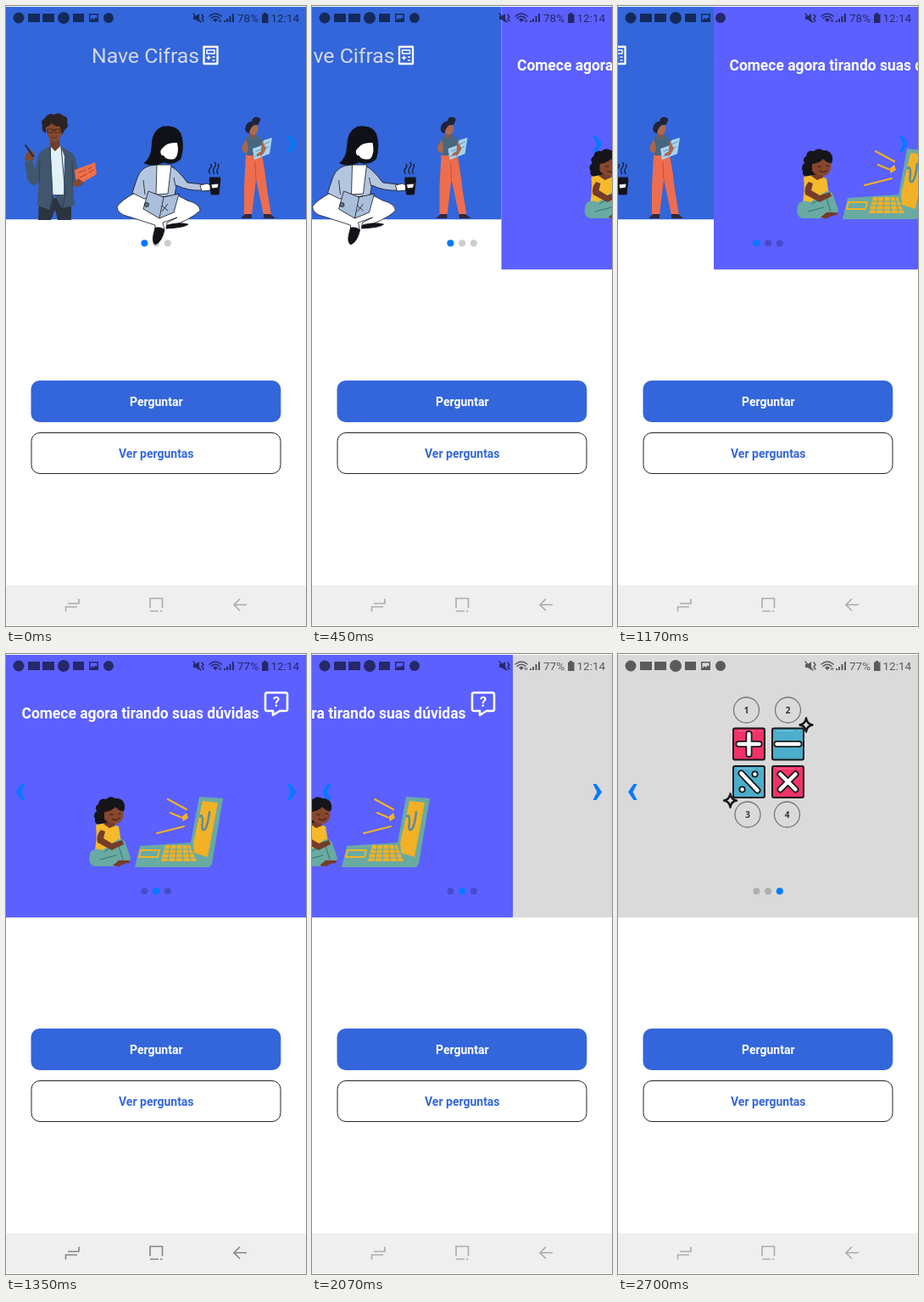
An HTML page that plays this animation: 354 px wide and 730 px high, repeating every 3.15 s.

```html
<!DOCTYPE html>
<html lang="pt">
<head>
<meta charset="utf-8">
<title>Carrossel</title>
<style>
  html, body { margin: 0; width: 100%; height: 100%; overflow: hidden; background: #fff; }
  svg { display: block; width: 354px; height: 730px; font-family: Roboto, sans-serif; }
  .line { fill: none; stroke-linecap: round; stroke-linejoin: round; }
  .b { font-weight: 700; }
  .mid { text-anchor: middle; }
</style>
</head>
<body>
<svg viewBox="0 0 354 730">
  <defs>
    <clipPath id="view"><rect y="1" width="354" height="310"/></clipPath>
    <path id="star" d="M0-8Q1-1 7.500 0Q1 1 0 8Q-1 1-7.500 0Q-1-1 0-8Z" fill="#dadada" stroke="#16161b" stroke-width="2.400" stroke-linejoin="round"/>
    <path id="chevron" d="M331.500 153h4l6.500 9.500-6.500 9.500h-4l5-9.500Z" fill="#007aff"/>
  </defs>

  <g clip-path="url(#view)">
    <g id="track">
      <g id="welcome">
        <path d="M0 1H354V251.200H0Z" fill="#3366da"/>
        <text x="101" y="67" font-size="24.800" fill="#d3d8e3">Nave Cifras</text>
        <g class="line" stroke="#fff" stroke-width="2.300">
          <path d="M233.500 48H249.500V68H233.500Z"/>
          <path d="M237 52H246V56H237ZM237 61H241M239 59V63M244 60H246M244 64H246" stroke-width="1.500"/>
        </g>

        <g id="man">
          <path d="M39 226H77L77 252H61L58 240 53 252H38Z" fill="#2b3440"/>
          <path d="M51 166L42 170Q37 175 34 193L31 181 22 184 25 203Q29 213 37 210L39 203 37 235 52 240 57 222 66 238 81 235 79 209Q87 215 92 209L87 202 82 180Q79 172 73 170L64 165Z" fill="#41566d"/>
          <path d="M53 164L57 170 64 164 69 177 68 222H55L53 180Z" fill="#e2f0f7"/>
          <path d="M52 167L55 222 52 239M65 166L70 220 67 237M40 182L39 208M78 183L79 211" class="line" stroke="#2c4056"/>
          <path d="M52 156H62L64 165 58 171 52 165Z" fill="#6d3f2c"/>
          <path d="M47 141Q56 134 66 142L65 153Q60 162 55 160 48 156 47 141Z" fill="#84492f"/>
          <path d="M47 150Q41 147 43 141Q40 135 46 132Q50 125 57 128Q63 124 67 129Q74 130 72 137Q75 143 69 146L66 152 64 142Q57 142 54 138Q50 142 47 143Z" fill="#2b2323"/>
          <path d="M49 145H55V149H49ZM58 145H64V149H58ZM55 146H58M53 155Q57 157 60 154" class="line" stroke="#432519" stroke-width=".8"/>
          <path d="M22 182L24 174 29 169 34 174 32 182Z" fill="#84492f"/>
          <path d="M23 164L32 177" class="line" stroke="#202936" stroke-width="2"/>
          <path d="M81 193L105 184 107 198 83 212Z" fill="#ee7049"/>
          <path d="M86 196L94 193M97 192L101 190M87 202L95 198M98 196L103 193" class="line" stroke="#9f4336"/>
          <path d="M78 209L85 203 91 207 84 214Z" fill="#84492f"/>
        </g>

        <g id="reader" stroke="#15161c" stroke-width=".8" stroke-linejoin="round">
          <path d="M152 220Q136 229 131 236Q131 245 145 248L176 258 176 265 187 264 185 255 202 249 190 255 189 261Q216 253 229 241Q229 233 214 229L197 220Z" fill="#fff"/>
          <path d="M176 261Q184 260 187 264Q184 278 176 281Q172 278 174 269Z" fill="#111319"/>
          <path d="M190 258Q204 254 215 257Q211 261 189 262Z" fill="#111319"/>
          <path d="M176 187Q160 188 155 202L149 220 163 227 199 223 201 211Q215 218 232 217V210L214 208Q203 193 195 189Z" fill="#b4c6df"/>
          <path d="M178 187L195 187 191 221 177 222Z" fill="#fff"/>
          <path d="M162 205L164 222M198 202L200 212" fill="none"/>
          <path d="M229 211L237 209 242 211 241 217 231 218Z" fill="#fff"/>
          <path d="M185 142Q201 140 206 150Q211 164 206 180Q198 188 186 184Q174 190 163 185Q171 179 172 166Q172 146 185 142Z" fill="#101116"/>
          <path d="M185 167Q190 160 202 161Q205 174 199 180Q189 182 186 176L184 176Q180 171 185 167Z" fill="#fff" stroke="none"/>
          <path d="M168 218L186 225 204 221 198 243 181 250 162 239Z" fill="#a9bedb"/>
          <path d="M186 225L181 250M184 235L191 241M191 233L184 242" fill="none"/>
          <circle cx="166" cy="234" r="2.500" fill="#65748c"/>
          <path d="M240 204H253L251 222H242Z" fill="#111319"/>
          <path d="M240 203H253" stroke-width="3"/>
          <path d="M242 210L251 209 250 214 243 215Z" fill="#fff"/>
          <path d="M241 198Q238 194 241 191T241 186M246 198Q243 194 246 190T246 184M250 198Q248 194 250 191T250 186" fill="none" stroke-width="1.200"/>
        </g>

        <g id="teacher">
          <path d="M283 175H302Q306 196 308 216L313 246H304L295 204 290 246H281L281 212Z" fill="#ee6d4e"/>
          <path d="M294 184L295 204" class="line" stroke="#c5513f"/>
          <path d="M277 250L282 245H290V250ZM304 245H312L318 250H304Z" fill="#30283b"/>
          <path d="M284 156L278 166 280 172 294 177 297 172 285 167 289 160Z" fill="#a9674c"/>
          <path d="M283 155L289 151 297 152 303 158 302 176H284L286 167Z" fill="#48677e"/>
          <path d="M288 147H294V153L291 156 288 153Z" fill="#94563f"/>
          <ellipse cx="292" cy="144" rx="5.500" ry="7.500" fill="#ad6a4d"/>
          <path d="M287 150Q280 148 283 141Q285 136 290 136Q291 130 297 131Q302 132 299 137Q298 141 293 140Q288 143 287 150Z" fill="#20243a"/>
          <path d="M291 168L302 164 304 158 314 155 311 174 293 181Z" fill="#a8d4ee"/>
          <path d="M294 177L302 173M295 171L301 169M304 163L311 160M304 168L310 166M303 164L301 177" class="line" stroke="#5685a9" stroke-width=".8"/>
          <path d="M302 158L307 168 303 175 296 177 296 174 301 171Z" fill="#a9674c"/>
        </g>
      </g>

      <g id="ask" transform="translate(354)">
        <path d="M0 1H354V310.200H0Z" fill="#5b60ff"/>
        <text class="b" x="18.500" y="75.800" font-size="17.450" fill="#fff">Comece agora tirando suas dúvidas</text>
        <path d="M308 45.500H330Q332 45.500 332 48V65Q332 67 330 67H323L315 72V67H308Q306 67 306 65V48Q306 45.500 308 45.500Z" class="line" stroke="#fff" stroke-width="2.600"/>
        <text class="b mid" x="319" y="62" font-size="17" fill="#fff">?</text>

        <g id="girl">
          <path d="M106 202Q112 196 121 199L133 203 136 222 124 234 104 235Q108 218 106 202Z" fill="#f5b92c"/>
          <path d="M100 233Q105 227 114 231L131 219Q138 216 141 223L147 240Q146 246 138 244L127 250H104Q95 246 100 233Z" fill="#69aaa2"/>
          <path d="M116 233L127 226M111 242L130 237M133 226L138 242" class="line" stroke="#33736e"/>
          <path d="M112 207Q106 213 108 222L125 231 139 224 137 219 125 223 115 217 117 209Z" fill="#753c28"/>
          <path d="M117 190H130L129 202 122 205 115 200Z" fill="#753c28"/>
          <path d="M112 200Q104 202 105 194Q102 189 107 185Q104 179 109 177Q110 169 118 171Q123 166 129 170Q138 169 140 178Q141 185 136 187L121 198Z" fill="#15151a"/>
          <path d="M116 186Q125 185 129 180Q134 185 138 185Q140 194 133 199Q122 202 116 194Z" fill="#87472d"/>
          <path d="M123 189H126M133 188H135M125 194Q130 198 134 193" class="line" stroke="#24130f"/>
          <path d="M126 249L133 243 145 243 146 246Q139 246 134 250Z" fill="#753c28"/>
        </g>

        <g id="laptop">
          <path d="M228 168L256 170 243 247 240 251H152L158 226 218 222Z" fill="#69aaa2"/>
          <path d="M232 173L250 175 238 239 222 234 221 222Z" fill="#f2b126"/>
          <path d="M229 191Q232 188 232 198Q230 208 234 207Q238 204 240 186" class="line" stroke="#5b8e98" stroke-width="2.500"/>
          <path d="M159 231H181L179 239H157Z" class="line" stroke="#f2b126" stroke-width="1.800"/>
          <path d="M188 225H217L225 244H183Z" fill="#f2b126"/>
          <path d="M187 230H219M186 235H221M184 240H223M194 225L191 244M201 225L200 244M208 225L209 244M214 225L218 244" class="line" stroke="#69aaa2" stroke-width="1.200"/>
          <path d="M191 171L213 183M194 187L206 192M178 211L210 203" class="line" stroke="#f2b126" stroke-width="2.200"/>
          <path d="M207 192L213 187 215 193 209 197Z" fill="#f2b126"/>
        </g>
      </g>

      <g id="maths" transform="translate(708)">
        <path d="M0 1H354V310.200H0Z" fill="#dadada"/>
        <g id="tiles"></g>
        <use href="#star" x="222" y="83.500"/>
        <use href="#star" x="132.500" y="172.500"/>
      </g>
    </g>
  </g>

  <g id="dots"></g>
  <use id="next" href="#chevron"/>
  <use id="prev" href="#chevron" transform="matrix(-1 0 0 1 354 0)"/>

  <g id="status" opacity=".58">
    <circle cx="15" cy="14" r="6.500"/>
    <path d="M26 9H40V19H26ZM43 9H57V19H43ZM79 9H92V19H79Z"/>
    <circle cx="68" cy="14" r="7"/>
    <path d="M98 9H109V19H98ZM99.500 10.500V17L102 14 104 16 106 13 107.500 15V10.500Z" fill-rule="evenodd"/>
    <circle cx="121" cy="14" r="6"/>
    <path d="M221 12H224L228 9V19L224 16H221Z"/>
    <path d="M221 9L230 19M231 10L233 13 231 15 233 18M240 12Q247 6 254 12M242 14.500Q247 10 252 14.500" class="line" stroke="#000" stroke-width="1.500"/>
    <path d="M244 16Q247 13 250 16L247 19ZM251 16H252V19H251ZM253 16H254V19H253ZM257 17H259V19H257ZM260 15H262V19H260ZM263.500 12H265.500V19H263.500ZM267 9H269V19H267Z"/>
    <path d="M302 9.500H304V8H307V9.500H309.500V20H302Z"/>
    <g font-size="13.500">
      <text id="charge" x="273" y="18.700"></text>
      <text x="312.500" y="18.700">12:14</text>
    </g>
  </g>

  <rect x="29.500" y="441" width="294.800" height="49" rx="10" fill="#3366da"/>
  <rect x="30" y="502.500" width="294" height="48" rx="10" fill="#fff" stroke="#25222c"/>
  <g class="b mid" font-size="14">
    <text x="177.300" y="471" fill="#fff">Perguntar</text>
    <text x="177.300" y="532" fill="#3366da">Ver perguntas</text>
  </g>

  <path d="M0 682H354V729H0Z" fill="#efefef"/>
  <path id="nav" d="M86 698V703.500H73M70.500 713V707.500H84M170 709V697.500H184.500V709M170 712.500H180M184.500 712.500H182M284 705H269M276 698L269 705 276 712" fill="none" stroke-width="1.600"/>
</svg>

<script>
const $ = id => document.getElementById(id);

function tile(x, y, color, sign) {
  const mark = (stroke, w) => `<path class="line" d="${sign}" stroke="${stroke}" stroke-width="${w}"/>`;
  return `<g transform="translate(${x} ${y})">
    <rect x="-18.500" y="-18.500" width="37" height="37" rx="2" fill="${color}" stroke="#17171c" stroke-width="2"/>
    <path class="line" d="M-13-15.500H7M12-15.500H14" stroke="#fff" opacity=".3"/>
    ${mark('#17171c', 8)}${mark('#fff', 4.5)}</g>`;
}

function badge(x, y, n) {
  return `<circle cx="${x}" cy="${y}" r="15" fill="none" stroke="#777" stroke-width="1.300"/>
    <text class="b mid" x="${x}" y="${y + 3.6}" font-size="10" font-family="Open Sans, sans-serif" fill="#333">${n}</text>`;
}

const pink = '#f23268', teal = '#4baeca';
$('tiles').innerHTML =
  badge(151.5, 66, 1) + badge(200.5, 66, 2) + badge(153, 189, 3) + badge(199.5, 189, 4) +
  tile(154.5, 106, pink, 'M-12 0H12M0-12V12') +
  tile(200.5, 106, teal, 'M-13 0H13') +
  tile(154.5, 150.5, teal, 'M-9-10L10 10M7-9h.1M-8 9h.1') +
  tile(200.5, 150.5, pink, 'M-9-9L9 9M9-9L-9 9');

const dots = [0, 1, 2].map(i => {
  const dot = document.createElementNS('http://www.w3.org/2000/svg', 'circle');
  dot.setAttribute('cx', 163.4 + i * 13.7);
  dot.setAttribute('cy', 279.2);
  dot.setAttribute('r', 4);
  return $('dots').appendChild(dot);
});

const STEP = 450;
const scroll = [0, 130.5, 241, 354, 471, 617, 708];

function draw(ms) {
  const x = scroll[Math.floor(ms / STEP) % scroll.length];
  const page = Math.floor(x / 354);
  $('track').setAttribute('transform', `translate(${-x})`);
  dots.forEach((dot, i) => {
    dot.setAttribute('fill', i === page ? '#007aff' : '#000');
    dot.setAttribute('opacity', i === page ? 1 : 0.2);
  });
  $('prev').style.display = page > 0 ? '' : 'none';
  $('next').style.display = page < 2 ? '' : 'none';
  $('charge').textContent = page ? '77%' : '78%';
  $('nav').setAttribute('stroke', x === 354 ? '#858585' : '#ababab');
}

const start = performance.now();
function tick() {
  draw(performance.now() - start);
  requestAnimationFrame(tick);
}
tick();
</script>
</body>
</html>
```
